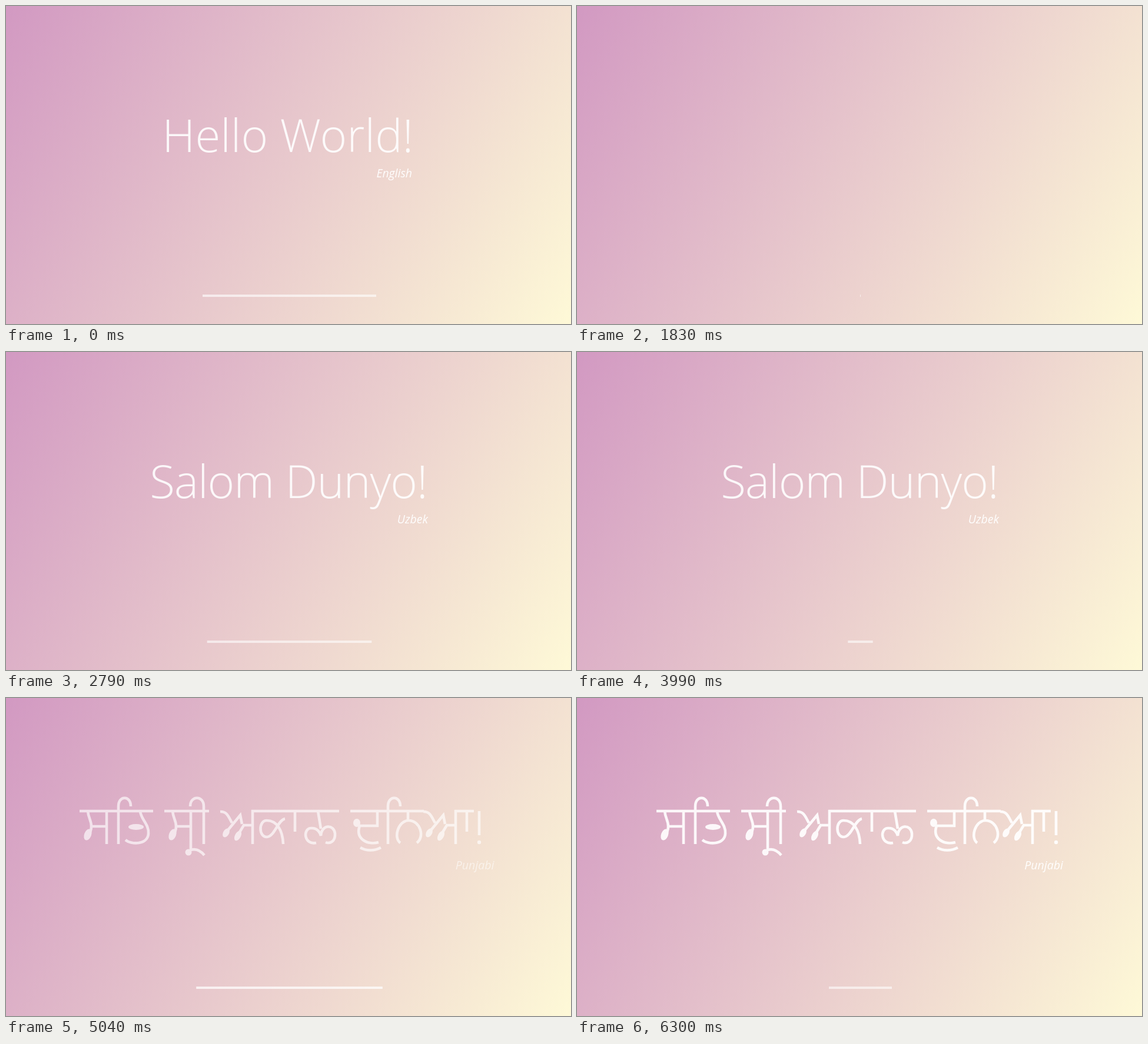
An HTML page that plays this animation: 960x540 px, repeating every 6.33 s.

```html
<!DOCTYPE html>
<html lang="en">
<head>
<meta charset="utf-8">
<title>Hello World</title>
<style>
  html, body { margin: 0; width: 100%; height: 100%; overflow: hidden; }
  body { background: linear-gradient(120deg, #d299c2 0%, #fef9d7 100%); }
  svg { display: block; width: 960px; height: 540px; }
  text { font-family: "Open Sans", "Noto Sans", sans-serif; fill: #fff; }
  .title { font-size: 78px; font-weight: 300; text-anchor: middle; }
  .tight { letter-spacing: -1px; }
  .label { font-size: 19.5px; font-style: italic; text-anchor: end; }
  .strokes { fill: none; stroke: #fff; stroke-width: 4.6; }
  .dots { fill: #fff; stroke: none; }
</style>
</head>
<body>
<svg viewBox="0 0 960 540">
  <defs>
    <g id="sa">
      <path d="M149 192C150 204 155 208 155 218C155 226 152 230 149 233M155 218H181"/>
      <ellipse class="dots" cx="149" cy="232" rx="6" ry="10" transform="rotate(22 149 232)"/>
    </g>
    <g id="aira">
      <path d="M374 193C386 192 389 204 394 212M384 228L408 199L411 214M402 236L414 216H429M429 190V248"/>
      <ellipse class="dots" cx="384" cy="229" rx="5" ry="8" transform="rotate(30 384 229)"/>
      <ellipse class="dots" cx="404" cy="234" rx="5" ry="9" transform="rotate(28 404 234)"/>
    </g>
    <path id="sihari" d="M201 248V184C201 165 222 165 222 184"/>
  </defs>

  <g class="phrase">
    <text class="title" x="480" y="248">Hello World!</text>
    <text class="label" x="690" y="291">English</text>
  </g>

  <g class="phrase">
    <text class="title tight" x="480" y="248">Salom Dunyo!</text>
    <text class="label" x="717" y="291">Uzbek</text>
  </g>

  <g class="phrase">
    <g class="title strokes" role="img" aria-label="ਸਤਿ ਸ੍ਰੀ ਅਕਾਲ ਦੁਨਿਆ!">
      <path d="M135 192H260M279 192H355M427 192H576M595 192H720M772 192H805"/>
      <use href="#sa"/>
      <path d="M181 192V248"/>
      <use href="#sihari"/>
      <path d="M238 192C239 206 253 214 252 230C251 250 222 249 213 241"/>
      <ellipse class="dots" cx="231" cy="219" rx="13" ry="5"/>
      <use href="#sa" x="144"/>
      <path d="M324 192V258C334 255 342 261 347 267M323 184C323 165 346 165 346 184V248"/>
      <circle class="dots" cx="320" cy="262" r="5.5"/>
      <use href="#aira"/>
      <path d="M484 205C472 207 466 236 453 236C439 236 439 208 453 208C470 208 480 224 481 248"/>
      <path d="M501 192V227"/>
      <path d="M537 246C516 250 514 222 528 221C540 220 544 230 545 234C546 214 567 214 569 230C570 244 560 248 553 245M540 192L545 222"/>
      <path d="M641 192V217H611C603 240 625 250 643 245M612 254C622 260 636 260 647 254"/>
      <ellipse class="dots" cx="606" cy="212" rx="6" ry="7"/>
      <use href="#sihari" x="458"/>
      <path d="M693 192V208M680 246C668 238 676 208 694 208C714 208 722 236 708 246"/>
      <use href="#aira" x="345"/>
      <path d="M793 192V227M814 192V233"/>
      <circle class="dots" cx="814" cy="245" r="3.2"/>
    </g>
    <text class="label" x="826" y="291">Punjabi</text>
  </g>

  <rect id="bar" y="490" height="4" fill="#fff"/>
</svg>
<script>
  const LOOP = 6330, STEP = 30;
  const CYCLE = 2667, LEAD = 737, GROW = 267;
  const BAR_WIDTH = 320, BAR_CENTER = 481.5;

  const bar = document.getElementById("bar");
  const phrases = [...document.querySelectorAll(".phrase")].map(group => ({
    group,
    title: group.querySelector(".title"),
    label: group.querySelector(".label")
  }));

  const progress = (time, start, length) =>
    Math.min(1, Math.max(0, (time - start) / length));

  // Cubic Bézier (.42, 0, .58, 1), solved by bisection.
  function easeInOut(x) {
    let low = 0, high = 1;
    for (let i = 0; i < 24; i++) {
      const s = (low + high) / 2, r = 1 - s;
      if (1.26 * s * r * r + 1.74 * s * s * r + s ** 3 < x) low = s;
      else high = s;
    }
    return low * low * (3 - 2 * low);
  }

  function place(node, dx, opacity) {
    node.setAttribute("transform", `translate(${dx.toFixed(2)} 0)`);
    node.setAttribute("opacity", opacity.toFixed(3));
  }

  function render(time) {
    const index = Math.floor((time + LEAD) / CYCLE);
    const phase = (time + LEAD) % CYCLE;
    const leave = 1 - easeInOut(progress(phase, 2190, 400));

    phrases.forEach(({ group, title, label }, i) => {
      group.setAttribute("visibility", i === index ? "visible" : "hidden");
      if (i !== index) return;
      const slide = easeInOut(progress(phase, 0, 889));
      place(title, -20 * (1 - slide), 0.9 * progress(phase, 40, 560) * leave);
      const enter = progress(phase, 177, 450);
      place(label, 10 * (1 - easeInOut(enter)), 0.95 * enter * leave);
    });

    const width = BAR_WIDTH * (phase < GROW
      ? easeInOut(phase / GROW)
      : 1 - easeInOut(progress(phase, GROW, CYCLE - GROW)));
    bar.setAttribute("x", BAR_CENTER - width / 2);
    bar.setAttribute("width", width);
    bar.setAttribute("opacity", 0.8 - 0.2 * progress(phase, GROW, 530));
  }

  const start = performance.now();
  function tick() {
    const time = (performance.now() - start) % LOOP;
    render(Math.floor(time / STEP) * STEP);
    requestAnimationFrame(tick);
  }
  tick();
</script>
</body>
</html>
```
